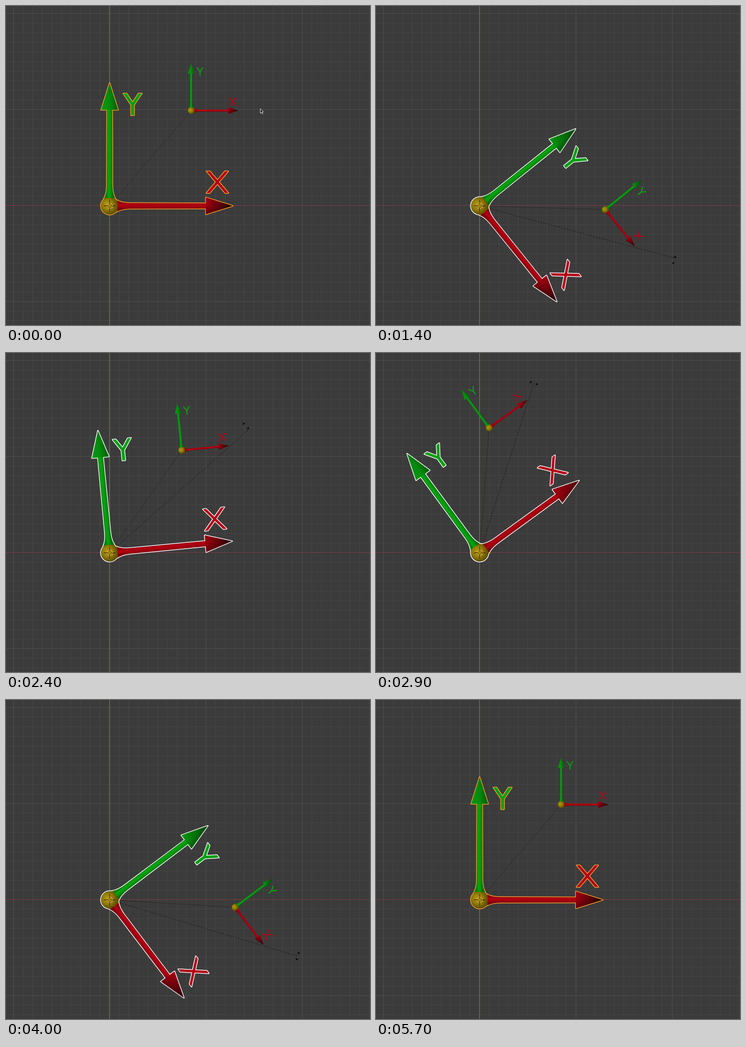
An HTML page with a canvas for the animation above (6.1 s loop, 798 by 701 pixels).

```html
<!DOCTYPE html>
<html lang="en">
<head>
<meta charset="utf-8">
<title>Rotation about the pivot</title>
<style>
  html, body { margin: 0; width: 100%; height: 100%; overflow: hidden; background: #3b3b3b; }
  canvas { display: block; }
</style>
</head>
<body>
<canvas id="view" width="798" height="701"></canvas>
<script>
const ctx = document.getElementById('view').getContext('2d');
const W = 798, H = 701, LOOP = 6100, STEP = 100;
const RAD = Math.PI / 180;
const PIVOT = { x: 227.2, y: 439.2 };
const CHILD = { x: 178.8, y: -209.4, scale: 0.385 };
const GRAB = -36.2;                 // pointer angle when the rotation begins
const FIRST = 4, LAST = 50, GONE = 57;
const RED = [180, 0, 18], GREEN = [6, 166, 16];

// Each swing adds its turn (degrees clockwise) over a span of steps
const SWINGS = [
  { from: 4.4, span: 13.9, turn: 60.6, delay: 5.6 },
  { from: 18.5, span: 11.5, turn: -96.9, delay: 2.5 },
  { from: 28, span: 12, turn: 89.2, delay: 5.6 },
  { from: 42, span: 9, turn: -52.9, delay: 5.6 }
];

const clamp01 = v => Math.min(1, Math.max(0, v));
const mix = (a, b, u) => a + (b - a) * u;
const shade = (c, k) => `rgb(${c.map(v => Math.round(v * k))})`;
const polar = (r, deg) => [r * Math.cos(deg * RAD), r * Math.sin(deg * RAD)];
const ease = (u, delay) => (1 - (1 - clamp01(u)) ** 3) ** delay;
const angleAt = s => SWINGS.reduce((sum, w) => sum + w.turn * ease((s - w.from) / w.span, w.delay), 0);
const reachAt = s => 424 + angleAt(s) / 2 - s / 2;

function poly(...pts) {
  const p = new Path2D();
  pts.forEach(([x, y]) => p.lineTo(x, y));
  p.closePath();
  return p;
}

// A letter stroke with level ends
const bar = (x0, y0, x1, y1, half = 3.6) =>
  poly([x0 - half, y0], [x0 + half, y0], [x1 + half, y1], [x1 - half, y1]);

function join(...paths) {
  const p = new Path2D();
  paths.forEach(q => p.addPath(q));
  return p;
}

const BALL = new Path2D();
BALL.arc(0, 0, 19.2, 0, 7);
const SHAFT = new Path2D('M213 -5.8 L44 -6.2 Q27 -6.6 17 -12 Q18.5 0 17 12 Q27 6.6 44 6.2 L213 5.8Z');
const COLLAR = poly([18, -11.5], [10, -15.5], [10, 15.5], [18, 11.5]);
const CONE = poly([211, -18.6], [269.8, 0], [211, 18.6]);
const LETTER_Y = join(bar(33.6, -247, 50.3, -222), bar(67, -247, 50.3, -222), bar(50.3, -224, 50.3, -199.3, 3.3));
const LETTER_X = join(bar(216.2, -76, 256.8, -28.2), bar(256.3, -76, 215.8, -28.2));

function gradient(x0, y0, x1, y1, stops) {
  const g = ctx.createLinearGradient(x0, y0, x1, y1);
  stops.forEach((c, i) => g.addColorStop(i / (stops.length - 1), c));
  return g;
}

function fill(path, style) {
  ctx.fillStyle = style;
  ctx.fill(path);
}

function along(deg, draw) {
  ctx.save();
  ctx.rotate(deg * RAD);
  draw();
  ctx.restore();
}

function line(x0, y0, x1, y1, color, dash = [], width = 1) {
  ctx.strokeStyle = color;
  ctx.lineWidth = width;
  ctx.setLineDash(dash);
  ctx.beginPath();
  ctx.moveTo(x0, y0);
  ctx.lineTo(x1, y1);
  ctx.stroke();
  ctx.setLineDash([]);
}

function arrow(color, heading) {
  const tip = 1 - .88 * Math.max(0, Math.cos((heading - 20) * RAD));
  fill(SHAFT, gradient(0, -7, 0, 7, [.76, 1, .9, .64].map(k => shade(color, k))));
  fill(CONE, gradient(211, 0, 269, 0, [.92, mix(.5, .9, tip), .82 * tip].map(k => shade(color, k))));
  fill(CONE, gradient(0, -18, 0, 18, ['rgba(0,0,0,0)', 'rgba(0,0,0,.08)', 'rgba(0,0,0,.4)']));
}

function gizmo(x, y, scale, angle, outline) {
  ctx.save();
  ctx.translate(x, y);
  ctx.rotate(angle * RAD);
  ctx.scale(scale, scale);
  if (outline) {
    ctx.strokeStyle = outline;
    ctx.lineWidth = 3;
    ctx.lineJoin = 'round';
    [BALL, LETTER_X, LETTER_Y].forEach(p => ctx.stroke(p));
    for (const d of [0, -90]) along(d, () => [SHAFT, COLLAR, CONE].forEach(p => ctx.stroke(p)));
  }
  const [lx, ly] = polar(8, -150 - angle);
  const gold = ctx.createRadialGradient(lx, ly, 2, lx * .3, ly * .3, 21);
  ['#a8930a', '#927d06', '#594a00'].forEach((c, i) => gold.addColorStop(i / 2, c));
  for (const d of [0, -90]) along(d, () => fill(COLLAR, '#857205'));
  fill(BALL, gold);
  along(-90, () => arrow(GREEN, angle - 90));
  arrow(RED, angle);
  fill(LETTER_Y, '#08a012');
  fill(LETTER_X, '#b40518');
  ctx.restore();
}

function grid() {
  ctx.fillStyle = '#3b3b3b';
  ctx.fillRect(0, 0, W, H);
  for (const major of [false, true]) {
    const color = major ? '#515151' : '#464646';
    for (let i = -21; i < 30; i++) {
      if ((i % 10 === 0) !== major) continue;
      const x = Math.floor(227 + i * 21.1) + .5, y = Math.floor(438.6 + i * 21.1) + .5;
      line(x, 0, x, H, color);
      line(0, y, W, y, color);
    }
  }
  line(0, 438.5, W, 438.5, '#873b45');
  line(227, 0, 227, H, '#62832f', [], 1.4);
}

function crosshair() {
  ctx.save();
  ctx.translate(PIVOT.x, PIVOT.y);
  ctx.lineWidth = 1.3;
  for (let i = 0; i < 16; i++) {
    ctx.strokeStyle = i % 2 ? '#f5e9dc' : '#d5502c';
    ctx.beginPath();
    ctx.arc(0, 0, 6.3, i * Math.PI / 8, (i + 1) * Math.PI / 8);
    ctx.stroke();
  }
  for (let i = 0; i < 4; i++) along(i * 90, () => line(3.5, 0, 13, 0, '#15130a'));
  ctx.restore();
}

function pointer(x, y) {
  const p = poly([.5, .5], [.5, 10.5], [2.8, 8.5], [4.4, 12], [6, 11.3], [4.5, 7.8], [7.4, 7.6]);
  ctx.save();
  ctx.translate(x, y);
  fill(p, '#222');
  ctx.strokeStyle = '#e8e8e8';
  ctx.lineWidth = 1;
  ctx.stroke(p);
  ctx.restore();
}

function pointerAt(s) {
  if (s < FIRST) {
    const u = s / FIRST;
    return [557 + 11 * u, 225 - 36 * u * u];
  }
  if (s >= 55) return [65.5, .5 - 7 * (s - 55)];
  const u = clamp01((s - LAST) / 3);
  return [mix(570, 57.5, u), mix(190, 1.5, u)];
}

function rotateCursor(x, y, heading) {
  ctx.save();
  ctx.translate(x, y);
  for (const d of [90, -90]) along(heading + d, () => {
    line(4.5, 0, 8, 0, '#050505');
    fill(poly([9.8, 0], [5.2, -3.6], [6.6, 0], [5.2, 3.6]), '#050505');
  });
  ctx.restore();
}

function draw(ms) {
  const s = Math.floor((ms % LOOP) / STEP);
  const active = s >= FIRST && s <= LAST;
  const angle = active ? angleAt(s) : 0;
  const { x, y } = PIVOT;
  const c = Math.cos(angle * RAD), n = Math.sin(angle * RAD);
  const cx = x + CHILD.x * c - CHILD.y * n, cy = y + CHILD.x * n + CHILD.y * c;

  grid();
  line(x, y, cx, cy, 'rgba(10,10,10,.75)', [2, 2]);
  if (active) {
    const [mx, my] = polar(reachAt(s), angle + GRAB);
    line(x, y, x + mx, y + my, 'rgba(10,10,10,.9)', [3, 3]);
  }
  gizmo(cx, cy, CHILD.scale, angle);
  gizmo(x, y, 1, angle, active ? '#ffffff' : '#f6a02d');
  crosshair();

  if (active) {
    // the pointer runs slightly ahead of the rotation
    const heading = angleAt(s + .1) + GRAB;
    const [mx, my] = polar(reachAt(s + .1), heading);
    rotateCursor(x + mx, y + my, heading);
  } else if (s < GONE) {
    pointer(...pointerAt(s));
  }
}

const start = performance.now();
function tick() {
  draw(performance.now() - start);
  requestAnimationFrame(tick);
}
tick();
</script>
</body>
</html>
```
